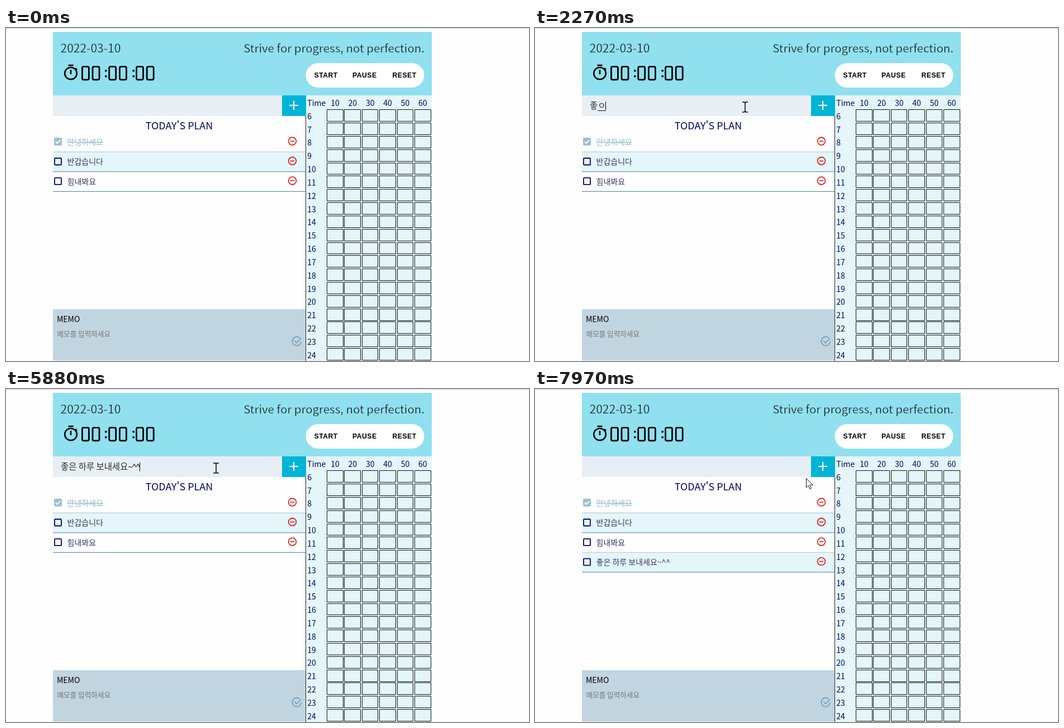
Write an HTML page with a canvas that moves like this. It is 936 by 598 pixels and loops after 8000 ms.

```html
<!DOCTYPE html>
<html lang="ko">
<head>
<meta charset="utf-8">
<title>Planner</title>
<style>
  html, body { margin: 0; width: 100%; height: 100%; overflow: hidden; background: #fefefe; }
  canvas { display: block; width: 936px; height: 598px; }
</style>
</head>
<body>
<canvas id="stage" width="936" height="598"></canvas>
<script>
const ctx = document.getElementById('stage').getContext('2d');
const LOOP = 8000;
const NAVY = '#03045e', CYAN = '#00b4d8', SKY = '#90e0ef', TINT = '#e4f6f9', FIELD = '#e7eff5';
const KR = '"Noto Sans CJK KR", "Noto Sans CJK", "Noto Sans CJK JP", sans-serif';
const ARIAL = '"Liberation Sans", Arial, sans-serif';
const ROW = 35.45, LIST_TOP = 187;
const ITEMS = ['안녕하세요', '반갑습니다', '힘내봐요', '좋은 하루 보내세요~^^'];
const ADDED = 7350;

// [time, committed text, syllable being composed]
const TYPING = [
  [0, '', ''], [1600, '', 'ㅈ'], [1670, '', '조'], [1870, '', '좋'],
  [2200, '좋', 'ㅇ'], [2290, '좋', '으'], [2380, '좋', '은'], [2480, '좋은 ', ''],
  [2570, '좋은 ', 'ㅎ'], [2660, '좋은 ', '하'], [2760, '좋은 ', '할'],
  [2850, '좋은 하', '루'], [2950, '좋은 하루 ', ''],
  [3090, '좋은 하루 ', 'ㅂ'], [3150, '좋은 하루 ', '보'], [3550, '좋은 하루 ', '본'],
  [3950, '좋은 하루 보', '내'], [4200, '좋은 하루 보', '냇'],
  [4340, '좋은 하루 보내', '세'], [4480, '좋은 하루 보내', '셍'],
  [4760, '좋은 하루 보내세', '요'], [5220, '좋은 하루 보내세요~', ''],
  [5780, '좋은 하루 보내세요~^', ''], [5880, '좋은 하루 보내세요~^^', ''],
  [ADDED, '', '']
];
const CARET = [[0, 0], [990, 1], [1400, 0], [1600, 1], [5680, 0], [5780, 1],
  [6480, 0], [6980, 1], [ADDED, 0]];

// [time, x, y] of the pointer's hot spot
const ENTER = [[240, 868, 553], [500, 640, 405], [660, 500, 310], [790, 378, 226],
  [900, 378, 137], [990, 376, 142]];
const CLICK = [[6810, 384, 143], [6950, 438, 150], [7080, 493, 158], [7140, 498, 153],
  [7210, 502, 148.5], [7620, 502, 148.5], [7690, 499, 156], [7800, 490, 160], [7950, 485, 160]];

const clamp = v => Math.max(0, Math.min(1, v));
const ease = v => v * v * (3 - 2 * v);
const latest = (list, t) => list.filter(k => k[0] <= t).pop();

function along(path, t) {
  const i = path.findIndex(k => k[0] > t);
  if (i < 0) return path[path.length - 1].slice(1);
  if (i === 0) return path[0].slice(1);
  const a = path[i - 1], b = path[i], f = (t - a[0]) / (b[0] - a[0]);
  return [a[1] + (b[1] - a[1]) * f, a[2] + (b[2] - a[2]) * f];
}

function rect(x, y, w, h, color) {
  ctx.fillStyle = color;
  ctx.fillRect(x, y, w, h);
}

// o.thin is the background colour used to shave the glyph edges to a light weight
function text(s, x, y, size, color, o = {}) {
  ctx.font = `${o.weight || 400} ${size}px ${o.family || KR}`;
  ctx.textAlign = o.align || 'left';
  ctx.fillStyle = color;
  ctx.fillText(s, x, y);
  if (o.thin) {
    ctx.strokeStyle = o.thin;
    ctx.lineWidth = .45;
    ctx.strokeText(s, x, y);
  }
  return ctx.measureText(s).width;
}

function stroke(color, width, build) {
  ctx.strokeStyle = color;
  ctx.lineWidth = width;
  ctx.beginPath();
  build();
  ctx.stroke();
}

function line(color, width, ...p) {
  stroke(color, width, () => {
    for (let i = 0; i < p.length; i += 2) ctx.lineTo(p[i], p[i + 1]);
  });
}

function disc(x, y, r, color, width, from = 0, to = Math.PI * 2) {
  stroke(color, width, () => ctx.arc(x, y, r, from, to));
}

function stopwatch() {
  disc(116, 81.5, 10.8, '#000', 2.6);
  line('#000', 2.6, 111.5, 67, 120.5, 67);
  line('#000', 2.6, 116, 75, 116, 83);
  line('#000', 2.6, 124, 72, 127, 75);
  for (const x of [136.4, 155, 184.7, 203.4, 233.5, 252.2]) {
    stroke('#000', 2.8, () => ctx.roundRect(x, 69.4, 12, 23.4, 2.5));
  }
  for (const x of [177, 226.5]) {
    rect(x, 75, 3.4, 3.4, '#000');
    rect(x, 85, 3.4, 3.4, '#000');
  }
}

function header() {
  rect(0, 0, 936, 1, '#cfcfcf');
  rect(84, 7, 678, 114, SKY);
  text('2022-03-10', 97.5, 43.5, 21, '#111', { thin: SKY });
  text('Strive for progress, not perfection.', 749, 43.5, 20.45, '#111', { thin: SKY, align: 'right' });
  stopwatch();
  ctx.fillStyle = '#fff';
  ctx.beginPath();
  ctx.roundRect(536.5, 63, 212, 44, 22);
  ctx.fill();
  ctx.letterSpacing = '0.5px';
  ['START', 'PAUSE', 'RESET'].forEach((s, i) =>
    text(s, [551.5, 620, 691.5][i], 89, 12.2, '#000', { weight: 700, family: ARIAL }));
  ctx.letterSpacing = '0px';
}

// one-pixel frame whose edges snap to whole pixels
function cell(x, y, w, h) {
  const l = Math.round(x), t = Math.round(y);
  stroke('#111', 1, () =>
    ctx.rect(l + .5, t + .5, Math.round(x + w) - l - 1, Math.round(y + h) - t - 1));
}

function timetable() {
  rect(537, 121, 225, 477, TINT);
  rect(536, 121, 1, 477, '#222');
  text('Time', 539.3, 140, 14, NAVY);
  for (let c = 0; c < 6; c++) {
    text(`${(c + 1) * 10}`, 589 + c * 31.35, 140, 14, NAVY, { align: 'center' });
  }
  for (let r = 0; r < 19; r++) {
    const y = 146.2 + r * 23.83;
    text(`${r + 6}`, 539.3, y + 17.6, 14, NAVY);
    for (let c = 0; c < 6; c++) cell(574 + c * 31.4, y, 29.6, 21.9);
  }
}

function item(label, i) {
  const top = LIST_TOP + i * ROW, mid = top + 17.5, done = i === 0;
  if (i % 2) rect(84, top, 452, ROW, TINT);
  rect(84, top + ROW - .4, 452, 1, '#4d809e');
  if (done) {
    ctx.fillStyle = '#9fbfd0';
    ctx.beginPath();
    ctx.roundRect(86, mid - 7.5, 14, 14, 2);
    ctx.fill();
    line('#fff', 1.8, 88.7, mid - .5, 91.7, mid + 2.5, 97.4, mid - 3.2);
  } else {
    stroke(NAVY, 1.8, () => ctx.roundRect(87, mid - 6.2, 12, 12, 1));
  }
  const color = done ? '#93b9cc' : '#34366a';
  const w = text(label, 109.5, mid + 5.3, 14, color);
  if (done) rect(109.5, Math.round(mid), w, 1, color);
  disc(512.5, mid - 1.2, 6.9, '#e01212', 1.6);
  line('#e01212', 1.6, 508.8, mid - 1.2, 516.2, mid - 1.2);
}

function memo() {
  rect(84, 505, 452, 92, '#c1d5e0');
  text('MEMO', 91, 528, 14, '#000');
  text('메모를 입력하세요', 91.5, 554, 12.6, '#757575');
  disc(520.3, 562.5, 8, '#6497b5', 1.5, .05, Math.PI * 1.72);
  line('#6497b5', 1.5, 516.2, 561.5, 520, 565.4, 528, 557);
}

function entry(t) {
  rect(84, 121, 410, 37, FIELD);
  const [, fixed, active] = latest(TYPING, t);
  const cut = (fixed + '~').indexOf('~');
  let x = 98;
  x += text(fixed.slice(0, cut), x, 145, 15.4, '#2c2c2c');
  x += text(fixed.slice(cut), x, 145, 14, '#000', { family: ARIAL });
  if (active) {
    const w = text(active, x, 145, 15.4, '#2c2c2c');
    rect(x, 148, w, 1, '#111');
    x += w;
  }
  if (latest(CARET, t)[1]) rect(Math.round(x), 132, 1, 15.5, '#000');
}

function addButton(t) {
  const k = ease(clamp((t - 7150) / 240)) - ease(clamp((t - 7680) / 270));
  const mix = (a, b) => Math.round(a + (b - a) * k);
  rect(494, 121, 43, 37, k ? `rgb(${mix(0, 3)},${mix(180, 4)},${mix(216, 94)})` : CYAN);
  ctx.save();
  ctx.translate(515, 139);
  ctx.rotate(k * Math.PI / 4);
  line('#fff', 2.2, -8, 0, 8, 0);
  line('#fff', 2.2, 0, -8, 0, 8);
  ctx.restore();
}

function shape(x, y, d) {
  ctx.save();
  ctx.translate(x, y);
  const p = new Path2D(d);
  ctx.fillStyle = '#fff';
  ctx.fill(p);
  ctx.strokeStyle = '#111';
  ctx.lineWidth = 1;
  ctx.stroke(p);
  ctx.restore();
}

const arrow = (x, y) => shape(x, y, 'M.5 .5V17L4.3 13.4L6.9 19.6L9.5 18.5L7 12.4H12.3Z');

function hand(x, y) {
  shape(x, y, 'M-1.5 1.5Q0 -1 1.5 1.5V8Q3.5 6.5 5 8.5Q7 7.3 8 9.3Q10.5 8.5 10.5 11.5' +
    'V15Q10.5 18 8.5 20V22.5H0V20.5L-5.5 13Q-6 10.5 -3.8 11L-1.5 13.5Z');
  line('#111', 1, x + 1.5, y + 8, x + 1.5, y + 12);
  line('#111', 1, x + 5, y + 8.5, x + 5, y + 12);
}

function beam(x, y) {
  line('#000', 1.5, x, y - 8, x, y + 8);
  for (const s of [-1, 1]) {
    line('#000', 1.5, x - 5, y + s * 9, x - 1.5, y + s * 9, x, y + s * 7.8,
      x + 1.5, y + s * 9, x + 5, y + s * 9);
  }
}

// the pointer moves in discrete steps
const step = (t, from, size) => from + Math.floor((t - from) / size + .01) * size;

function pointer(t) {
  if (t < 240) return;
  const [x, y] = t < 6810 ? along(ENTER, step(t, 240, 84.4)) : along(CLICK, step(t, 6810, 67.6));
  const inBar = y > 121 && y < 158 && x > 84 && x < 536;
  if (!inBar) arrow(x, y);
  else if (x < 494) beam(x, y);
  else hand(x, y);
}

function draw(t) {
  rect(0, 0, 936, 598, '#fefefe');
  header();
  timetable();
  text("TODAY'S PLAN", 310, 182, 17.9, NAVY, { align: 'center' });
  ITEMS.slice(0, t < ADDED ? 3 : 4).forEach(item);
  memo();
  entry(t);
  addButton(t);
  pointer(t);
}

const start = performance.now();
function frame() {
  draw((performance.now() - start) % LOOP);
  requestAnimationFrame(frame);
}
frame();
</script>
</body>
</html>
```
